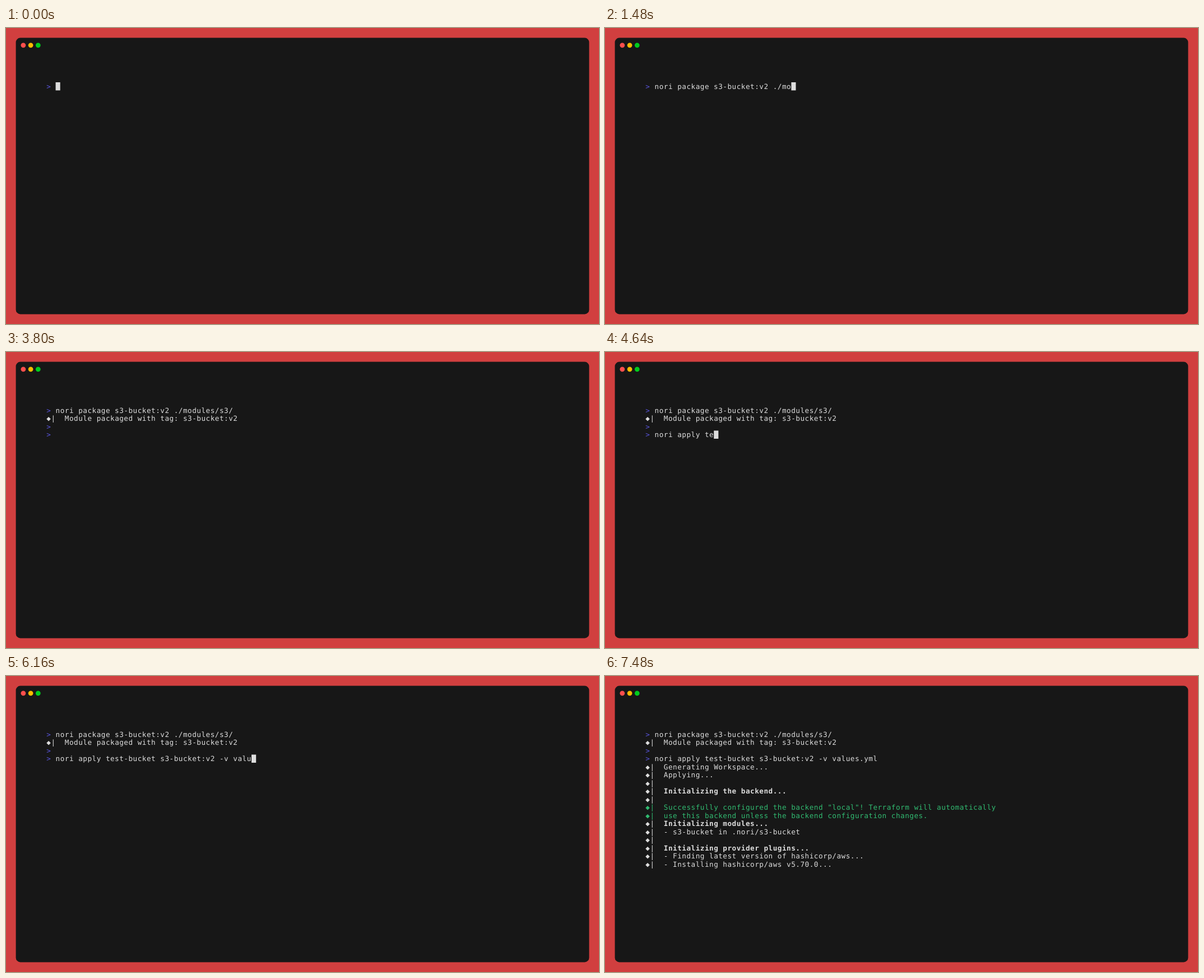
An HTML page for the animation above (8 s loop, 1058x529 px).

```html
<!DOCTYPE html>
<html lang="en">
<head>
<meta charset="utf-8">
<title>Terminal session</title>
<style>
  html, body { margin: 0; width: 100%; height: 100%; overflow: hidden; background: #d13f3f; }
  svg { display: block; width: 1058px; height: 529px; }
  text {
    font: 12.65px "DejaVu Sans Mono", monospace;
    letter-spacing: 0.511px;
    white-space: pre;
    text-rendering: geometricPrecision;
    fill: #ddd;
  }
  .prompt { fill: #5a56e0; }
  .bold { font-weight: bold; }
  .green { fill: #31bb71; }
</style>
</head>
<body>
<svg viewBox="0 0 1058 529">
  <rect x="17.6" y="17.6" width="1022.8" height="493.8" rx="8" fill="#171717"/>
  <circle cx="30.85" cy="30.85" r="4.4" fill="#ff4f4d"/>
  <circle cx="44.1" cy="30.85" r="4.4" fill="#febb00"/>
  <circle cx="57.3" cy="30.85" r="4.4" fill="#00cc1d"/>
  <g id="screen"></g>
  <rect id="cursor" width="8.13" height="14.5" fill="#ddd"/>
</svg>
<script>
const LOOP = 8000, TICK = 40;
const LEFT = 72.3, TOP = 97, COL = 8.127, ROW = 14.5, BASELINE = 11.75;
const screen = document.getElementById("screen");
const cursor = document.getElementById("cursor");
const items = [];

function addText(at, row, col, text, cls = "") {
  const el = document.createElementNS("http://www.w3.org/2000/svg", "text");
  el.setAttribute("x", LEFT + col * COL);
  el.setAttribute("y", TOP + row * ROW + BASELINE);
  el.setAttribute("class", cls);
  el.textContent = text;
  screen.append(el);
  items.push({ at, el });
  return el;
}

const addPrompt = (at, row) => addText(at, row, 0, ">", "prompt");

function addOutput(at, row, text, cls = "") {
  addText(at, row, 0, "◆|", cls === "green" ? cls : "");
  if (text) addText(at, row, 4, text, cls);
}

const commands = [
  { start: 0, row: 0, text: "nori package s3-bucket:v2 ./modules/s3/" },
  { start: 4000, row: 3, text: "nori apply test-bucket s3-bucket:v2 -v values.yml" }
];
for (const c of commands) c.el = addText(c.start, c.row, 2, "");

addPrompt(0, 0);
addOutput(2000, 1, "Module packaged with tag: s3-bucket:v2");
addPrompt(2000, 2);
addPrompt(2040, 3);
addOutput(6520, 4, "Generating Workspace...");
addOutput(6520, 5, "Applying...");
addOutput(6560, 6);
addOutput(6560, 7, "Initializing the backend...", "bold");
addOutput(6600, 8);
addOutput(6600, 9, 'Successfully configured the backend "local"! Terraform will automatically', "green");
addOutput(6600, 10, "use this backend unless the backend configuration changes.", "green");
addOutput(6600, 11, "Initializing modules...", "bold");
addOutput(6600, 12, "- s3-bucket in .nori/s3-bucket");
addOutput(6600, 13);
addOutput(6600, 14, "Initializing provider plugins...", "bold");
addOutput(6600, 15, "- Finding latest version of hashicorp/aws...");
addOutput(6920, 16, "- Installing hashicorp/aws v5.70.0...");

// One key every 50 ms
const typed = (c, t) =>
  Math.max(0, Math.min(c.text.length, Math.floor((t - c.start + 20) / 50)));

// Cursor cell outside typing: [from, row, column]
const stops = [[2000, 2, 2], [2040, 3, 2], [6480, 4, 0], [6520, 6, 0], [6600, 16, 0], [6920, 17, 0]];
const hidden = [[2640, 3240], [3800, 4040], [7480, 8000]];

function cursorCell(t) {
  const c = commands.find(c => t >= c.start && t < c.start + (c.row ? 2480 : 2000));
  if (c) return [c.row, 2 + typed(c, t)];
  return stops.filter(s => s[0] <= t).pop().slice(1);
}

const show = (el, on) => { el.style.visibility = on ? "visible" : "hidden"; };

function render(t) {
  for (const { at, el } of items) show(el, t >= at);
  for (const c of commands) {
    const text = c.text.slice(0, typed(c, t));
    if (c.el.textContent !== text) c.el.textContent = text;
  }
  const [row, col] = cursorCell(t);
  cursor.setAttribute("x", LEFT + col * COL);
  cursor.setAttribute("y", TOP + row * ROW);
  show(cursor, !hidden.some(([a, b]) => t >= a && t < b));
}

const begin = performance.now();
function frame() {
  const t = (performance.now() - begin) % LOOP;
  render(Math.floor(t / TICK) * TICK);
  requestAnimationFrame(frame);
}
frame();
</script>
</body>
</html>
```
